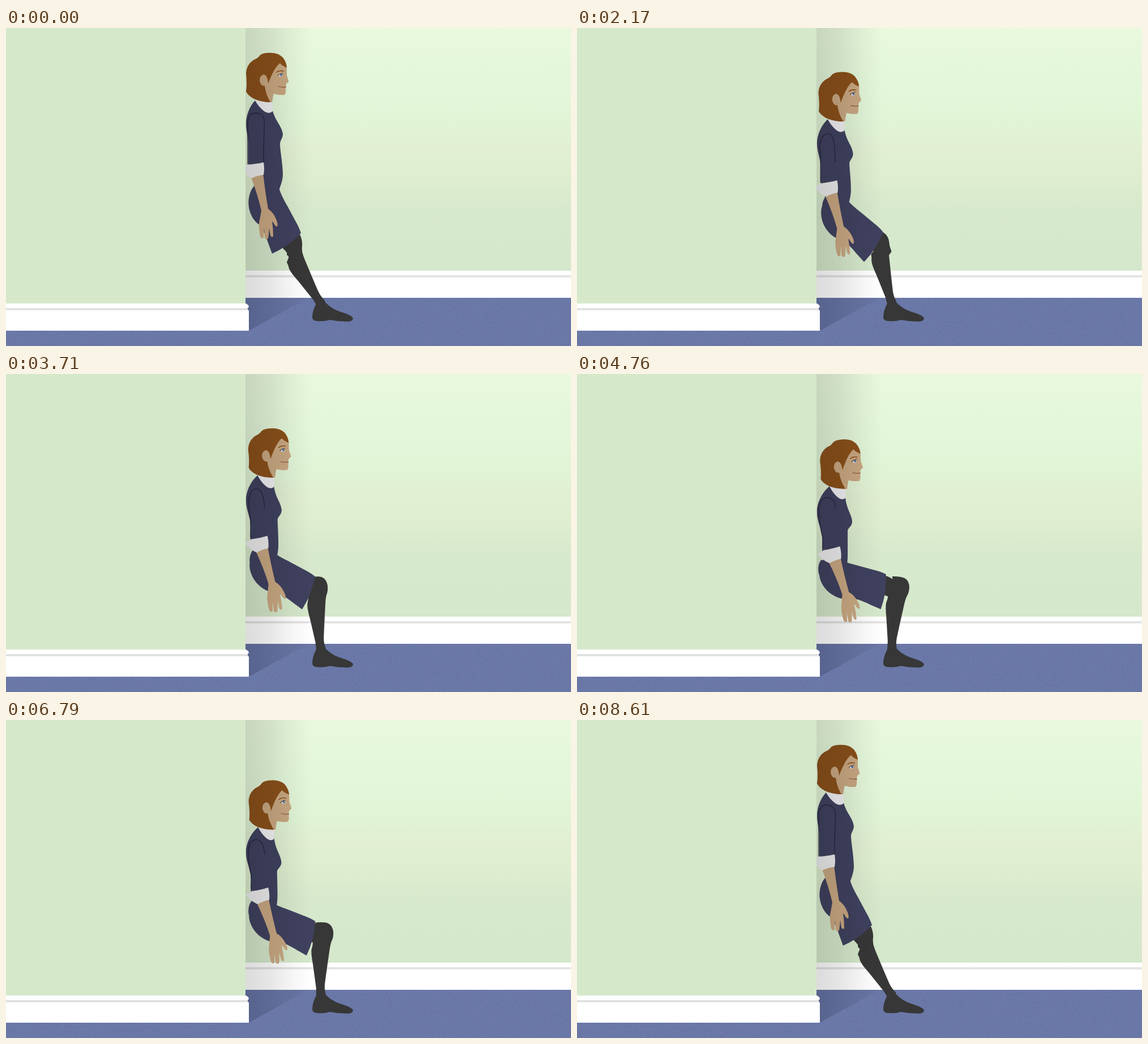
These frames come from a looping animation (998x561 px, 8.75 s). An HTML page:

```html
<!DOCTYPE html>
<html lang="en">
<head>
<meta charset="utf-8">
<title>Wall sit</title>
<style>
html, body { margin: 0; width: 100%; height: 100%; overflow: hidden; }
svg { display: block; width: 100vw; height: 100vh; }
.dress { fill: #40415f; }
.leg { fill: #373737; }
.skin { fill: #c9a882; }
.hair { fill: #8a501a; }
.line { fill: none; stroke-linecap: round; }
</style>
</head>
<body>
<svg viewBox="0 0 998 561" preserveAspectRatio="none">
  <defs>
    <linearGradient id="wall" x2="0" y2="1">
      <stop stop-color="#e8f9dd"/>
      <stop offset=".22" stop-color="#e4f7da"/>
      <stop offset=".42" stop-color="#e0f4d5"/>
      <stop offset=".49" stop-color="#e2efd2"/>
      <stop offset=".6" stop-color="#dfeecf"/>
      <stop offset=".74" stop-color="#d7e9cc"/>
      <stop offset="1" stop-color="#d5e8cb"/>
    </linearGradient>
    <linearGradient id="shade">
      <stop stop-opacity=".14"/>
      <stop offset=".35" stop-opacity=".1"/>
      <stop offset=".7" stop-opacity=".04"/>
      <stop offset="1" stop-opacity="0"/>
    </linearGradient>
    <linearGradient id="cast">
      <stop stop-color="#202840" stop-opacity=".26"/>
      <stop offset="1" stop-color="#202840" stop-opacity=".03"/>
    </linearGradient>
    <filter id="carpet" x="0" y="0" width="1" height="1" color-interpolation-filters="sRGB">
      <feTurbulence type="fractalNoise" baseFrequency=".7" numOctaves="2" seed="4"/>
      <feColorMatrix values="0 0 0 0 .15  0 0 0 0 .18  0 0 0 0 .35  .5 0 0 0 -.2"/>
    </filter>
  </defs>

  <rect x="420" width="578" height="430" fill="url(#wall)"/>
  <rect y="476" width="998" height="85" fill="#6e7cac"/>
  <rect y="476" width="998" height="85" filter="url(#carpet)"/>
  <path d="M423 476H534L429 534H423Z" fill="url(#cast)"/>
  <rect x="423" y="428" width="575" height="48" fill="#fff"/>
  <rect x="423" y="436" width="575" height="4" fill="#e4e4e4"/>

  <path class="leg" d="M548 486Q541 499 541 510Q541 517 550 517Q562 518 572 515Q588 518 604 518Q613 517 613 512Q611 507 595 502Q577 497 566 486Q560 478 553 479Z"/>
  <path id="shin" class="leg" d="M558 357Q575 357 581 361Q588 366 588 377Q587 388 583 393Q580 400 577 414Q568 452 565 466Q563 476 565 485A9 9 0 0 1 548 486L549 472Q548 450 547 430Q545 410 547 403Q550 396 550 392L561 385Z"/>
  <g id="thigh">
    <path class="leg" d="M485 370L510 355L520 366Q524 376 523 385Q522 392 522 399L505 410L496 400Q497 394 493 387Z"/>
    <path class="dress" d="M483 285Q487 297 497 314L511 340Q518 352 521 362Q498 386 470 398L463 379Q457 360 449 348C434 340 426 318 429 300C431 288 436 281 438 279C442 270 452 262 460 262Z"/>
  </g>
  <path id="torso" class="dress"/>
  <path id="collar" fill="#f1f0f3"/>
  <path id="sleeve" class="line" stroke="#25263b" stroke-width="1.3"/>
  <g id="arm">
    <path class="skin" d="M432 261L454 256Q458 290 463 319Q472 325 477 337Q481 346 479 350Q476 351 472 343L470 341Q472 354 472 367Q470 371 467 366L465 353Q464 366 463 371Q460 375 457 370L456 353L455 370Q452 373 449 368Q446 352 447 344Q449 334 451 322Q445 295 432 261Z"/>
    <path d="M414 247L426 241Q442 240 455 237Q457 248 455 259Q444 260 434 265Q424 260 414 247Z" fill="#ededee"/>
  </g>
  <g id="head">
    <path class="hair" d="M447 50Q450 45 460 44Q480 42 489 52Q496 61 496 71L484 64L467 131Q452 131 438 125Q427 119 424 112Q426 100 424 80Q425 64 438 56Q445 53 447 50Z"/>
    <path class="skin" d="M484 62Q474 69 463 98Q462 83 455 82Q448 84 448 93Q450 103 457 102Q459 118 467 131L470 131Q471 123 473 116Q482 119 492 118Q495 114 494 108L495 104L494 102L496 97Q500 96 499 93L496 83L496 70Q489 68 484 62Z"/>
    <path class="line" d="M478 78Q483 74 490 76" stroke="#8a501a" stroke-width="1.6"/>
    <path d="M481 84Q484 80 488 81L488 85Q484 87 481 84Z" fill="#e9e6e4"/>
    <circle cx="486" cy="83" r="1.9" fill="#4766a0"/>
    <path class="line" d="M480 84Q484 80 489 80" stroke="#33302f" stroke-width="1"/>
    <path class="line" d="M481 103Q486 105 494 104" stroke="#8d5b45" stroke-width="1.3"/>
  </g>

  <rect x="423" width="117" height="476" fill="url(#shade)"/>
  <rect width="423" height="487" fill="#d5e9ca"/>
  <path d="M0 486H424L428 489L429 492L426 495L429 499V534H0Z" fill="#fff"/>
  <rect y="494" width="427" height="4" fill="#e2e2e2"/>
</svg>
<script>
const LOOP = 8750, STEP = 70, MOVE = 920;
const downs = [150, 3120, 6095], ups = [1690, 4690, 7665];

// Outline pairs: standing, sitting
const morphs = {
  torso: [
    "M440 128C430 138 424 155 424 168C424 183 428 192 428 203L428 240L445 290L482 287C486 275 489 268 489 258C489 240 484 215 484 205C484 198 489 195 489 187C487 172 476 165 471 146Z",
    "M446 199C434 209 423 228 424 246C424 262 433 275 434 296L433 315L445 350L476 345C478 330 478 325 478 315C478 300 478 285 478 277C479 272 486 270 486 261C485 248 476 240 474 218Z"],
  collar: [
    "M440 128Q455 127 470 130L471 147Q464 153 455 146Q446 139 440 128Z",
    "M446 199Q460 198 475 202L474 220Q468 225 460 218Q452 211 446 199Z"],
  sleeve: [
    "M427 240L427 168C427 155 434 150 441 150C450 150 456 156 456 163C457 175 455 190 455 237",
    "M434 308L434 290C427 262 427 245 427 238C428 225 434 219 441 219C450 219 456 225 457 236C457 265 460 285 462 305"]
};

const $ = id => document.getElementById(id);
const ease = x => (1 - Math.cos(Math.PI * Math.min(1, Math.max(0, x)))) / 2;
const ramp = (t, starts) => starts.reduce((sum, s) => sum + ease((t - s) / MOVE), 0);

function mix([a, b], p) {
  const end = b.match(/\d+/g);
  let i = 0;
  return a.replace(/\d+/g, n => (+n + (end[i++] - n) * p).toFixed(2));
}

function place(id, dx, dy, angle, cx, cy) {
  $(id).setAttribute("transform", `translate(${dx} ${dy}) rotate(${angle} ${cx} ${cy})`);
}

function draw(now) {
  const t = Math.floor(now % LOOP / STEP) * STEP;
  const p = ramp(t, downs) - ramp(t, ups);
  for (const id in morphs) $(id).setAttribute("d", mix(morphs[id], p));
  place("head", 5.5 * p, 73 * p, -2.3 * p, 460, 87);
  place("arm", 12 * p, 69 * p, -5.6 * p, 443, 262);
  place("thigh", 2 * p, 73 * p, -47 * p, 438, 295);
  place("shin", 0, 0, -36 * (1 - p), 556, 486);
}

const start = performance.now();
function tick() {
  draw(performance.now() - start);
  requestAnimationFrame(tick);
}
tick();
</script>
</body>
</html>
```
